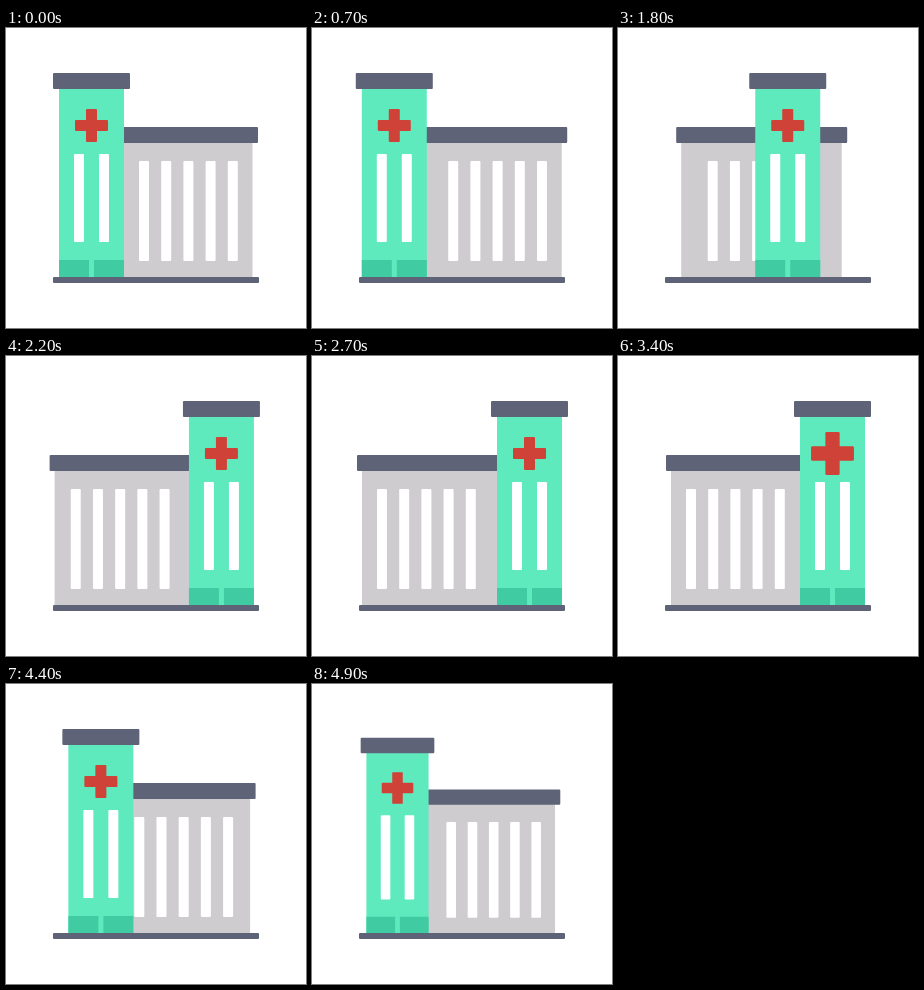
Recreate the animation shown at these times as an HTML page. Size 300 by 300 pixels, loop 5 s.

```html
<!DOCTYPE html>
<html>
<head>
<meta charset="utf-8">
<style>
html, body { margin: 0; width: 100%; height: 100%; overflow: hidden; background: #fff; }
svg { display: block; width: 100%; height: 100%; }
.slate { fill: #5e6377; }
.wall { fill: #cfccd0; }
.mint { fill: #5eeabd; }
.door { fill: #40cba2; }
.pane { fill: #fff; }
.cross { fill: #cf4238; }
</style>
</head>
<body>
<!-- Each part is drawn around its own bottom centre. -->
<svg viewBox="0 0 300 300">
  <g id="ward">
    <rect class="wall" x="-80.5" y="-136" width="160.5" height="136"/>
    <rect class="slate" x="-85.5" y="-150" width="171" height="16" rx="1"/>
    <g id="panes" class="pane"></g>
  </g>
  <g id="tower">
    <rect class="mint" x="-32.5" y="-190" width="65" height="190"/>
    <rect class="slate" x="-38.5" y="-204" width="77" height="16" rx="1"/>
    <rect class="pane" x="-17.5" y="-123" width="10" height="88" rx="1"/>
    <rect class="pane" x="7.5" y="-123" width="10" height="88" rx="1"/>
    <rect class="door" x="-32.5" y="-17" width="30" height="17"/>
    <rect class="door" x="2.5" y="-17" width="30" height="17"/>
    <g id="cross" class="cross">
      <rect x="-5.5" y="-16.5" width="11" height="33" rx="1"/>
      <rect x="-16.5" y="-5.5" width="33" height="11" rx="1"/>
    </g>
  </g>
  <rect class="slate" x="47" y="249" width="206" height="6" rx="1"/>
</svg>
<script>
const LOOP = 5000, GROUND = 249;
const part = id => document.getElementById(id);
const [ward, panes, tower, cross] = ['ward', 'panes', 'tower', 'cross'].map(part);

for (let i = 0; i < 5; i++)
  panes.innerHTML += `<rect x="${i * 22.2}" y="-116" width="10" height="100" rx="1"/>`;

const span = (t, a, b) => Math.min(1, Math.max(0, (t - a) / (b - a)));
const smooth = (t, a, b) => { const u = span(t, a, b); return u * u * (3 - 2 * u); };
const swing = (t, a, b) => {
  const u = span(t, a, b), p = 2.3;
  return u < .5 ? (2 * u) ** p / 2 : 1 - (2 - 2 * u) ** p / 2;
};
const pulse = (t, a, b) => Math.sin(Math.PI * span(t, a, b)) ** 2;

// From left to right with wind-up and overshoot, then plainly back.
function travel(t, left, right) {
  const extra = 6 * Math.sign(right - left);
  if (t < 975) return left - extra * smooth(t, 400, 975);
  if (t < 2433) return left - extra + (right - left + 2 * extra) * swing(t, 975, 2433);
  if (t < 3550) return right + extra * (1 - smooth(t, 2433, 2970));
  return right + (left - right) * swing(t, 3570, 4630);
}

function draw(now) {
  const t = now % LOOP;
  const towerX = travel(t, 85.5, 214.5);
  const wardX = travel(t, 166.5, 133.5);
  const paneX = travel(t, 133, 68);
  const size = 1 - .088 * (smooth(t, 4400, 4800) - smooth(t, 4800, 5000));
  const beat = 1 + .3 * (pulse(t, 0, 600) + pulse(t, 3100, 3700));
  const place = (el, x) => el.setAttribute('transform', `translate(${x} ${GROUND}) scale(${size})`);
  place(tower, towerX);
  place(ward, wardX);
  panes.setAttribute('transform', `translate(${paneX - wardX} 0)`);
  cross.setAttribute('transform', `translate(0 -151.5) scale(${beat})`);
}

const start = performance.now();
function tick() {
  draw(performance.now() - start);
  requestAnimationFrame(tick);
}
tick();
</script>
</body>
</html>
```
